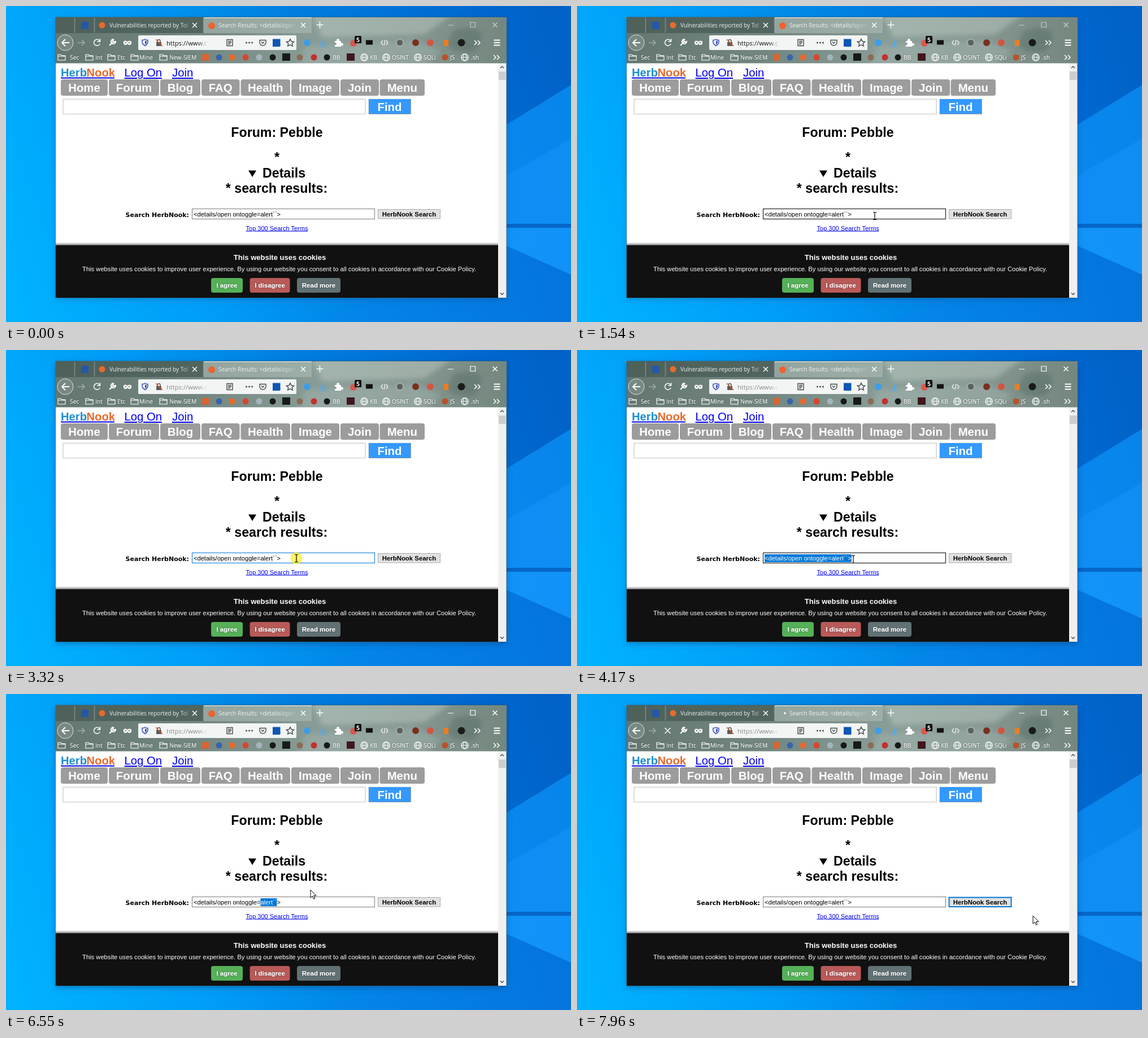
An HTML page that plays this animation: 1000x560 px, repeating every 8000 ms.

```html
<!DOCTYPE html>
<html lang="en">
<head>
<meta charset="utf-8">
<title>Browser search field</title>
<style>
  html, body { margin: 0; width: 100%; height: 100%; overflow: hidden; background: #0078d7; }
  svg { display: block; width: 1000px; height: 560px; }
  text { white-space: pre; font-family: "Liberation Sans", Arial, sans-serif; }
  .ui { font-family: "Open Sans", "Noto Sans", sans-serif; }
  .label { font-family: "DejaVu Sans", Verdana, sans-serif; }
  .b { font-weight: bold; }
  .link { fill: #0000ee; text-decoration: underline; }
  .line { fill: none; stroke: #fff; stroke-width: 1.5; }
</style>
</head>
<body>
<svg id="stage" viewBox="0 0 1000 560"></svg>
<script>
const stage = document.getElementById("stage");

// Markup helpers
const rect = (x, y, w, h, fill, more = "") =>
  `<rect x="${x}" y="${y}" width="${w}" height="${h}" fill="${fill}" ${more}/>`;
const dot = (x, y, r, fill, more = "") => `<circle cx="${x}" cy="${y}" r="${r}" fill="${fill}" ${more}/>`;
const text = (x, y, size, str, fill = "#000", cls = "", more = "") =>
  `<text x="${x}" y="${y}" font-size="${size}" fill="${fill}" class="${cls}" ${more}>${str.replace(/</g, "&lt;")}</text>`;
const mid = (x, y, size, str, fill, cls) => text(x, y, size, str, fill, cls, 'text-anchor="middle"');
const line = (d, more = "") => `<path class="line" d="${d}" ${more}/>`;
const cross = (x, y, r, more) => line(`M${x - r} ${y - r}l${2 * r} ${2 * r}m0 ${-2 * r}l${-2 * r} ${2 * r}`, more);
const grad = (id, x1, y1, x2, y2, stops) =>
  `<linearGradient id="${id}" gradientUnits="userSpaceOnUse" x1="${x1}" y1="${y1}" x2="${x2}" y2="${y2}">` +
  stops.map(([at, color, alpha = 1]) => `<stop offset="${at}" stop-color="${color}" stop-opacity="${alpha}"/>`).join("") +
  "</linearGradient>";
const fade = (id, from, to, color) => grad(id, from, 0, to, 0, [[0, color], [1, color, 0]]);

const query = "<details/open ontoggle=alert``>";

function desktop() {
  return rect(0, 0, 1000, 560, "url(#sky)") +
    `<path d="M870 220L1000 140V560H560L870 420Z" fill="#0a84ec" opacity=".45"/>
     <path d="M870 220L1000 140V387H870Z" fill="#0c95fb" opacity=".55"/>
     <path d="M870 310L1000 235V387H870Z" fill="#1a9cff" opacity=".35"/>
     <path d="M870 393H1000V476L870 418Z" fill="#149aff" opacity=".8"/>` +
    rect(870, 386, 130, 7, "#0766c8");
}

function header() {
  const globe = x => dot(x, 91, 6, "none", 'stroke="#fff" stroke-width="1.3"') +
    line(`M${x - 6} 91h12M${x} 85c-4 3 -4 9 0 12c4 -3 4 -9 0 -12`, 'style="stroke-width:1"');
  const folder = x => line(`M${x - 6} 96v-10h5l2 2h6v8zm0 -7h13`, 'style="stroke-width:1.1"');
  const label = (x, str) => text(x, 95, 10.3, str, "#fff", "ui", 'filter="url(#textShade)"');
  const more = (x, y) => line(`M${x - 5} ${y - 4}l4 4l-4 4m6 -8l4 4l-4 4`);
  const folders = [[98, 113, "Sec"], [147, 158, "Int"], [186, 197, "Etc"], [227, 236, "Mine"], [278, 289, "New-SIEM"]];
  const sites = [[634, 644, "KB"], [673, 683, "OSINT"], [729, 739, "SQLi"], [812, 823, ".sh"]];
  const marks = [[377, "#3b63a8"], [400, "#e8692c"], [424, "#d6452f"], [448, "#a4b3bb"], [472, "#15181a"],
    [520, "#8b6b55"], [545, "#c3302c"], [568, "#15181a"], [777, "#b5532e"]];

  return rect(88, 20, 798, 82, "url(#theme)") +
    `<g clip-path="url(#headClip)" filter="url(#soft)">
       <path d="M540 15H790L740 50L560 55Z" fill="#b9c8c2" opacity=".5"/>
       <path d="M530 72L720 60L770 80L740 105H520Z" fill="#a9bab4" opacity=".4"/>
       <path d="M790 45Q815 32 840 45Q845 70 825 82Q790 85 780 68Z" fill="#52655f" opacity=".4"/>
     </g>` +
    rect(88, 20, 262, 28, "#475a54", 'opacity=".75"') +
    rect(350, 20, 191, 28, "#b4c2bc", 'opacity=".5"') +
    rect(350, 20, 191, 1.5, "#d6dedb") +
    line("M121.500 21v26M156.500 21v26M349.500 21v26", 'stroke-opacity=".28"') +
    rect(133, 28, 13, 13, "#2458a6") +
    dot(170, 34, 5.5, "#e8692c") +
    text(183, 38, 10, "Vulnerabilities reported by Tol", "url(#fadeTab)", "ui") +
    cross(334, 34, 4) +
    `<g id="favicon">${dot(364, 35, 6, "#f0622d")}</g>` + dot(364, 34, 1.8, "#fff", 'id="throb"') +
    text(376, 38, 10, "Search Results: <details/open o", "url(#fadeActive)", "ui") +
    cross(526, 34, 4) + line("M549.500 33.500h12m-6 -6v12") +
    `<g id="controls">${line("M782 34h10M822 29h8.500v8.500h-8.500z", 'style="stroke-width:1.2"')}${cross(865.5, 33.5, 4)}</g>` +

    dot(105, 65, 14, "#fff", 'fill-opacity=".13" stroke="#dce3e0"') +
    line("M112 65h-13m6 -6l-6 6l6 6", 'style="stroke-width:2"') +
    line("M127 65h12m-5 -5l5 5l-5 5", 'opacity=".4"') +
    `<g id="reload">${line("M165.500 61.500a5.500 5.500 0 1 0 .7 5.500M166.500 58v5h-5")}</g>` +
    `<g id="stop">${cross(160.5, 65, 5)}</g>` +
    line("M183 70l6 -6M190 59a4 4 0 1 0 4 4l-3 1l-2 -2z", 'style="stroke-width:2.2"') +
    `<path d="M208 63q3 -3 7 0q4 -3 7 0q1 6 -4 6q-2 0 -3 -2q-1 2 -3 2q-5 0 -4 -6z" fill="#fff"/>` +
    dot(212, 65, 1.2, "#65716d") + dot(218, 65, 1.2, "#65716d") +
    rect(234, 52, 280, 26, "#f2f5f4", 'rx="2"') +
    `<path d="M246 59q3 2 5 1.500q1 7 -5 10q-6 -3 -5 -10q2 .5 5 -1.500z" fill="none" stroke="#3a4fc0" stroke-width="1.500"/>
     <path d="M246 61.500v7q3.500 -2 3 -6.500z" fill="#3a4fc0"/>` +
    rect(266, 64, 9, 7, "#585c5e") +
    line("M268 64v-2a2.500 2.500 0 0 1 5 0v2", 'style="stroke:#585c5e"') +
    line("M265 59l12 12", 'style="stroke:#e0502a"') +
    text(284, 69.5, 11.2, "https://www.c", "url(#fadeDark)", "ui", 'id="address"') +
    `<g fill="none" stroke="#44494b" stroke-width="1.400">
       <path d="M391 59.500h10v11h-10zM393 62.500h6M393 65h6M393 67.500h4"/>
       <path d="M449 60.500h11v4a5.500 5.500 0 0 1 -11 0zM452 63.500l2.500 2.500l2.500 -2.500"/>
       <path d="M503 58.500l2 4.300l4.700 .5l-3.500 3.200l1 4.600l-4.200 -2.400l-4.200 2.400l1 -4.600l-3.500 -3.200l4.700 -.5z"/>
     </g>` +
    [425, 430, 435].map(x => dot(x + .5, 65, 1.5, "#44494b")).join("") +
    rect(472, 58.5, 13.5, 13.5, "#0b57b5") +
    dot(533, 65, 6, "#3c9ee8") +
    line("M561 58v11m-5 -5l5 5l5 -5M555 72h12", 'style="stroke:#48a9f5"') +
    `<path d="M582 62h3.500a2.500 2.500 0 1 1 4 0h3.500v4a2.500 2.500 0 1 1 0 4v2h-11v-3a2.200 2.200 0 1 0 0 -4z" fill="#fff"/>` +
    dot(615, 66, 6, "#d9584e") + rect(617, 53, 12, 13, "#0c0c0d", 'rx="1.5"') +
    mid(623, 63.5, 10.5, "5", "#fff", "ui b") +
    rect(637, 60.5, 12, 8, "#111") +
    line("M667 61l-3 4l3 4m6 -8l3 4l-3 4m-2 -9l-2 10", 'opacity=".8"') +
    dot(697, 65, 6, "#59645f", 'stroke="#c8d0cd"') + dot(725, 65, 6, "#7a2f1e") + dot(751, 65, 6, "#d2553f") +
    rect(775, 60, 8, 11, "#ec7d24") + dot(806, 65, 6.5, "#191b1c") + more(834, 65) +
    line("M863.500 60.500h11m-11 4.500h11m-11 4.500h11", 'style="stroke-width:1.8"') +

    folders.map(([x, tx, s]) => folder(x) + label(tx, s)).join("") +
    rect(347, 85, 12, 12, "#d86532") +
    marks.map(([x, c]) => dot(x, 91, 5.5, c)).join("") +
    rect(489, 84, 14, 13, "#17191a") + rect(603, 84, 14, 13, "#40171d") +
    label(578, "BB") + label(786, "JS") +
    sites.map(([x, tx, s]) => globe(x) + label(tx, s)).join("") + more(868, 91);
}

function page() {
  const tabs = [[97, 180, "Home"], [182, 271, "Forum"], [273, 344, "Blog"], [346, 413.5, "FAQ"],
    [415.5, 503, "Health"], [505, 590, "Image"], [592, 660, "Join"], [661.5, 741, "Menu"]];
  const choices = [[363, 56, "#55b157", "I agree"], [431.5, 71, "#b95a58", "I disagree"], [515, 77, "#617174", "Read more"]];
  return rect(88, 101.5, 783, 415.5, "#fff") +
    `<g class="b">${text(97, 125, 20.2, "Herb", "#1b8fcf")}${text(142.5, 125, 20.2, "Nook", "#e8692c")}</g>` +
    rect(97, 126.5, 95, 2, "#0000ee") +
    text(209.5, 125, 20.3, "Log On", "", "link") + text(294, 125, 20.3, "Join", "", "link") +
    tabs.map(([a, b, s]) => rect(a, 130, b - a, 29, "#9c9c9c", 'rx="4"') + mid((a + b) / 2, 152, 20.4, s, "#fff", "b")).join("") +
    rect(101, 165, 535, 26.5, "#fff", 'stroke="#ddd" stroke-width="2"') +
    rect(641.5, 164.5, 75, 27, "#3399ff", 'stroke="#e3e3e3"') +
    line("M642 191.500h74.500v-27", 'style="stroke:#a0a0a0;stroke-width:1"') +
    mid(679, 185.5, 20.4, "Find", "#fff", "b") +
    mid(479.5, 232, 23.2, "Forum: Pebble", "#000", "b") + mid(479.5, 276, 23.2, "*", "#000", "b") +
    `<path d="M429 291.500h14l-7 11.500z"/>` +
    text(454, 304, 23.2, "Details", "#000", "b") + mid(479, 331, 23.2, "* search results:", "#000", "b") +
    text(324, 374, 11, "Search HerbNook:", "#000", "label b", 'text-anchor="end"') +
    rect(329.5, 359.5, 323, 18, "#fff", 'id="field"') +
    text(332, 373, 11.1, query, "#000", "", 'id="query"') +
    rect(0, 362, 0, 14, "#0078d7", 'id="mark"') +
    text(332, 373, 11.1, query, "#fff", "", 'clip-path="url(#markClip)"') +
    rect(658.5, 360.5, 110, 16.5, "#e1e1e1", 'id="search"') +
    mid(713.5, 373, 11.4, "HerbNook Search", "#000", "b") +
    mid(479.5, 397.5, 11, "Top 300 Search Terms", "", "link") +
    rect(88, 419, 783, 5, "url(#barShade)") + rect(88, 424, 783, 93, "#111") +
    mid(484.5, 450, 13, "This website uses cookies", "#fff", "b") +
    mid(483.5, 470, 11.2, "This website uses cookies to improve user experience. By using our website you consent to all cookies in accordance with our Cookie Policy.", "#fff") +
    choices.map(([x, w, c, s]) => rect(x, 482, w, 26, c, 'rx="4"') +
      `<g filter="url(#textShade)">${mid(x + w / 2, 499, 11.5, s, "#fff", "b")}</g>`).join("") +
    rect(871, 101.5, 14.5, 415.5, "#f0f0f0") + rect(872, 116, 12.5, 15, "#cdcdcd") +
    line("M875 110l3 -3l3 3M875 508.500l3 3l3 -3", 'style="stroke:#505050"');
}

stage.innerHTML = `<defs>
  ${grad("sky", 0, 480, 1000, 130, [[0, "#00b2ff"], [.3, "#009df7"], [.62, "#007ddf"], [.88, "#0069d0"], [1, "#0062c8"]])}
  ${grad("theme", 88, 30, 886, 70, [[0, "#63766f"], [.3, "#728680"], [.6, "#8b9e98"], [.8, "#84968f"], [1, "#74877f"]])}
  ${grad("barShade", 0, 419, 0, 424, [[0, "#000", 0], [1, "#000", .5]])}
  ${fade("fadeTab", 308, 334, "#eef2f0")}${fade("fadeActive", 485, 517, "#eef2f0")}
  ${fade("fadeDark", 338, 359, "#111")}${fade("fadeGray", 338, 359, "#888")}
  <clipPath id="headClip"><rect x="88" y="20" width="798" height="82"/></clipPath>
  <clipPath id="markClip"><rect id="markWindow" y="362" width="0" height="14"/></clipPath>
  <filter id="soft"><feGaussianBlur stdDeviation="4"/></filter>
  <filter id="shade" x="-10%" y="-10%" width="120%" height="120%"><feGaussianBlur stdDeviation="6"/></filter>
  <filter id="textShade"><feDropShadow dx="0" dy="0" stdDeviation=".8" flood-color="#222" flood-opacity=".6"/></filter>
  </defs>` + desktop() +
  rect(88, 23, 798, 497, "#002a60", 'id="shadow" filter="url(#shade)"') +
  rect(87.5, 19.5, 798.5, 498, "#47605f") + header() + page() +
  dot(0, 0, 10.5, "#ffea00", 'id="halo" opacity=".6"') +
  `<path id="arrow" d="M0 0V14.200L3.300 11.200L5.600 16.300L7.800 15.300L5.500 10.400H10Z" fill="#fff" stroke="#000"/>
   <path id="beam" d="M-3 -6.500h2.200l.8 .8l.8 -.8h2.200M0 -6v12M-3 6.500h2.200l.8 -.8l.8 .8h2.200" fill="none" stroke="#000" stroke-width="1.200"/>`;

const el = Object.fromEntries([...stage.querySelectorAll("[id]")].map(e => [e.id, e]));
const set = (e, attrs) => { for (const a in attrs) e.setAttribute(a, attrs[a]); };
const show = (e, on) => set(e, { visibility: on ? "visible" : "hidden" });

// Pointer path: [step, x, y]
const path = [[0, 975, 508], [4, 760, 310], [6, 640, 288], [10, 540, 368], [13, 443, 369], [17, 527, 372],
  [19, 546, 371], [22, 495, 370], [27, 311, 370], [29, 311, 370], [31, 303, 368], [39, 515, 369], [40, 514, 369],
  [45, 293, 370], [47, 292, 370], [51, 489, 371], [57, 451, 369], [58, 451, 369], [61, 455, 369], [63, 455, 369],
  [64, 472, 369], [66, 472, 369], [68, 451, 369], [70, 464, 369], [74, 479, 369], [78, 479, 369], [82, 539, 347],
  [85, 650, 362], [88, 724, 388], [91, 713, 370], [93, 713, 370], [97, 818, 399], [100, 807, 393]];

// Text drags: [press step, release step, anchor x]
const drags = [[22, 29, 495], [39, 47, 515], [67, 79, 451]];
const CLICK = 92, LOADED = 93, STEP = 77.5;

function pointer(k) {
  const i = Math.max(1, path.findIndex(p => p[0] >= k));
  const [a, b] = [path[i - 1], path[i]];
  const u = Math.max(0, (k - a[0]) / (b[0] - a[0]));
  return [a[1] + (b[1] - a[1]) * u, a[2] + (b[2] - a[2]) * u];
}

// Nearest caret place reached by x
function caret(x) {
  let pos = 332;
  for (let i = 0; i < query.length; i++) {
    const end = el.query.getEndPositionOfChar(i).x;
    if (x < pos + (end - pos) * .8) break;
    pos = end;
  }
  return pos;
}

function draw(t) {
  const k = t < 210 ? -1 : Math.min(100, Math.floor((t - 194) / STEP));
  const [x, y] = pointer(k);
  const drag = drags.filter(d => k >= d[0]).pop();
  const dragging = !!drag && k < drag[1];
  const loading = k >= LOADED;
  const inside = k >= 0 && x > 329 && x < 653 && y > 359 && y < 378;
  const overButton = x > 658 && x < 769 && y > 360 && y < 377;
  const beam = k >= 0 && y > 359 && y < 378 && x < 653;

  let from = 0, to = 0;
  if (drag && k < CLICK) {
    const ends = [caret(drag[2]), caret(pointer(Math.min(k, drag[1] - 1))[0])];
    from = Math.min(...ends);
    to = Math.max(...ends);
  }
  for (const e of [el.mark, el.markWindow]) set(e, { x: from, width: to - from });

  const released = !!drag && k === drag[1];
  set(el.field, { stroke: dragging ? "#0078d7" : inside || released ? "#000" : "#7a7a7a" });
  set(el.search, {
    fill: overButton ? "#e5f1fb" : "#e1e1e1",
    stroke: loading || overButton ? "#0078d7" : "#adadad",
    "stroke-width": loading ? 2 : 1
  });

  const active = k >= 22;
  set(el.controls, { opacity: active ? 1 : .55 });
  set(el.shadow, { opacity: active ? .4 : .25 });
  set(el.address, { fill: active ? "url(#fadeGray)" : "url(#fadeDark)" });
  show(el.reload, !loading);
  show(el.stop, loading);
  show(el.favicon, !loading);
  show(el.throb, loading);
  set(el.throb, { cx: 364 + 4 * Math.cos((k - 100) * .9) });

  const at = `translate(${x} ${y})`;
  for (const e of [el.arrow, el.beam, el.halo]) set(e, { transform: at });
  show(el.arrow, k >= 0 && !beam);
  show(el.beam, beam);
  show(el.halo, dragging || k === CLICK);
}

function tick(now) {
  draw(now % 8000);
  requestAnimationFrame(tick);
}
draw(0);
requestAnimationFrame(tick);
</script>
</body>
</html>
```
